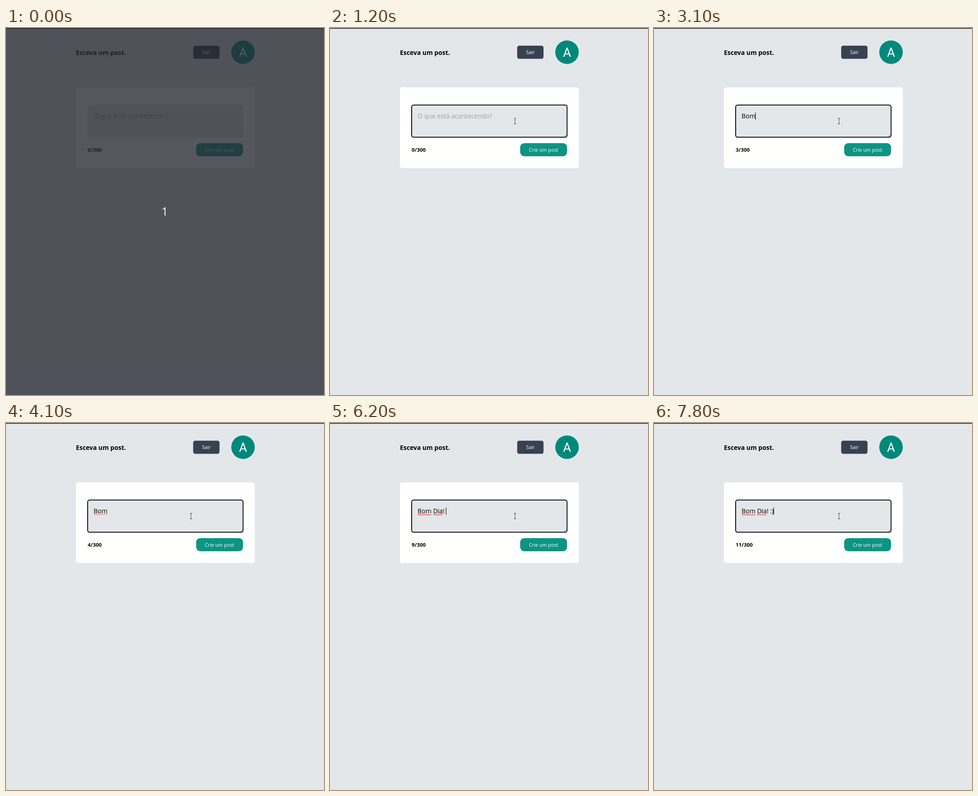
Animation of 697 by 804 pixels, one loop 8000 ms. Source, as an HTML page with a canvas:

```html
<!DOCTYPE html>
<html lang="pt">
<head>
<meta charset="utf-8">
<title>Escrever um post</title>
<style>
  html, body { margin: 0; width: 100%; height: 100%; overflow: hidden; background: #e3e7ea; }
  canvas { display: block; }
</style>
</head>
<body>
<canvas id="stage" width="697" height="804"></canvas>
<script>
const ctx = document.getElementById("stage").getContext("2d");
const LOOP = 8000;
const SANS = '"Open Sans", "Noto Sans", sans-serif';
const BODY = `13.9px ${SANS}`;
const FIELD = { x: 179, y: 168.7, w: 340.6, h: 70.6 };
const TEXT_X = 192;

// [start ms, text in the field]
const typing = [
  [0, ""], [2000, "B"], [2300, "Bo"], [2500, "Bom"], [2700, "Bomd"],
  [3100, "Bom"], [3500, "Bom "], [4400, "Bom D"], [4600, "Bom Di"],
  [4700, "Bom Dia"], [4900, "Bom Dia "], [5500, "Bom Dia"],
  [5800, "Bom Dia!"], [6100, "Bom Dia! "], [7000, "Bom Dia! :"],
  [7300, "Bom Dia! :0"], [7700, "Bom Dia! :"], [7800, "Bom Dia! :)"]
];
const caretOff = [[0, 700], [1200, 1800], [4100, 4400], [6700, 7000]];

const within = (t, [from, to]) => t >= from && t < to;

function box(x, y, w, h, r, color) {
  ctx.beginPath();
  ctx.roundRect(x, y, w, h, r);
  ctx.fillStyle = color;
  ctx.fill();
}

function label(text, x, y, font, color, align = "left") {
  ctx.font = font;
  ctx.textAlign = align;
  ctx.fillStyle = color;
  ctx.fillText(text, x, y);
}

function line(points, color, width) {
  ctx.beginPath();
  points.forEach(([x, y]) => ctx.lineTo(x, y));
  ctx.strokeStyle = color;
  ctx.lineWidth = width;
  ctx.stroke();
}

function textWidth(text) {
  ctx.font = BODY;
  return ctx.measureText(text).width;
}

function drawPage() {
  ctx.fillStyle = "#e3e7ea";
  ctx.fillRect(0, 0, 697, 804);
  ctx.fillStyle = "#222325";
  ctx.fillRect(0, 0, 697, 1.5);

  label("Esceva um post.", 153.3, 58.5, `bold 13.8px ${SANS}`, "#000");
  box(410.3, 38.7, 57.7, 28.8, 4.5, "#374151");
  label("Sair", 439.2, 57, `10.75px ${SANS}`, "#fff", "center");
  ctx.beginPath();
  ctx.arc(519.5, 53, 25.8, 0, Math.PI * 2);
  ctx.fillStyle = "#00897b";
  ctx.fill();
  label("A", 519.5, 63, "27px Roboto, sans-serif", "#fff", "center");

  box(153.3, 130, 392, 176.7, 5, "#fffffe");
  box(FIELD.x, FIELD.y, FIELD.w, FIELD.h, 5, "#e3e7ea");
  box(416.8, 252.2, 102.8, 28.8, 9, "#0d9483");
  label("Crie um post", 468, 270.5, `10.75px ${SANS}`, "#fff", "center");
}

function drawSquiggle(before, word, bottom) {
  const start = TEXT_X + textWidth(before);
  const end = start + textWidth(word);
  const points = [];
  for (let x = start; x <= end; x += 0.5) {
    points.push([x, 201 + 1.4 * Math.cos((x - start) * Math.PI / 2)]);
  }
  ctx.save();
  ctx.beginPath();
  ctx.rect(start, 198, end - start, bottom - 198);
  ctx.clip();
  line(points, "#f22", 1);
  ctx.restore();
}

function drawField(t) {
  const text = typing.findLast(([start]) => t >= start)[1];

  line([[513, 239], [519, 233]], "#555b61", 0.9);
  line([[516.5, 239], [519, 236.5]], "#555b61", 0.9);
  if (t >= 700) {
    ctx.beginPath();
    ctx.roundRect(FIELD.x, FIELD.y, FIELD.w, FIELD.h, 4.5);
    ctx.strokeStyle = "#101114";
    ctx.lineWidth = 2;
    ctx.stroke();
  }

  if (text) label(text, TEXT_X, 198, BODY, "#000");
  else label("O que está acontecendo?", TEXT_X, 198, BODY, "#98a0a6");
  if (t >= 3600) drawSquiggle("", "Bom", t < 5000 ? 201 : 204);
  if (within(t, [5000, 5500]) || t >= 6200) drawSquiggle("Bom ", "Dia", 204);

  if (!caretOff.some(span => within(t, span))) {
    ctx.fillStyle = "#000";
    ctx.fillRect(Math.floor(TEXT_X + textWidth(text)), 185, 1, 16);
  }
  label(`${text.length}/300`, 179, 271, `bold 11.4px ${SANS}`, "#000");
}

function drawBeam(x, y) {
  for (const [color, width] of [["#fff", 2.6], ["#222", 1]]) {
    line([[x, y - 6], [x, y + 6]], color, width);
    for (const end of [-6, 6]) line([[x - 2.5, y + end], [x + 2.5, y + end]], color, width);
  }
}

function drawArrow(x, y) {
  ctx.beginPath();
  [[0, 0], [0, 13], [3, 10], [5, 15], [7, 14], [5, 9.5], [9, 9.5]]
    .forEach(([dx, dy]) => ctx.lineTo(x + dx, y + dy));
  ctx.closePath();
  ctx.fillStyle = "#111";
  ctx.fill();
  ctx.strokeStyle = "#fff";
  ctx.lineWidth = 0.8;
  ctx.stroke();
}

function drawPointer(t) {
  if (t < 200) return;
  const left = 1 - Math.min(1, (Math.floor(t / 100) * 100 - 100) / 400);
  const x = 405.5 + 45 * left * left;
  const y = 204 - 190 * left * left;
  if (y > FIELD.y) drawBeam(x, y);
  else drawArrow(x, y);
}

function drawCountdown() {
  ctx.fillStyle = "rgba(38, 40, 48, 0.78)";
  ctx.fillRect(0, 1, 697, 803);
  label("1", 348, 411, `25px ${SANS}`, "#fff", "center");
}

function render(now) {
  const t = now % LOOP;
  drawPage();
  drawField(t);
  drawPointer(t);
  if (t < 100) drawCountdown();
}

const began = performance.now();
function tick() {
  render(performance.now() - began);
  requestAnimationFrame(tick);
}
tick();
</script>
</body>
</html>
```
